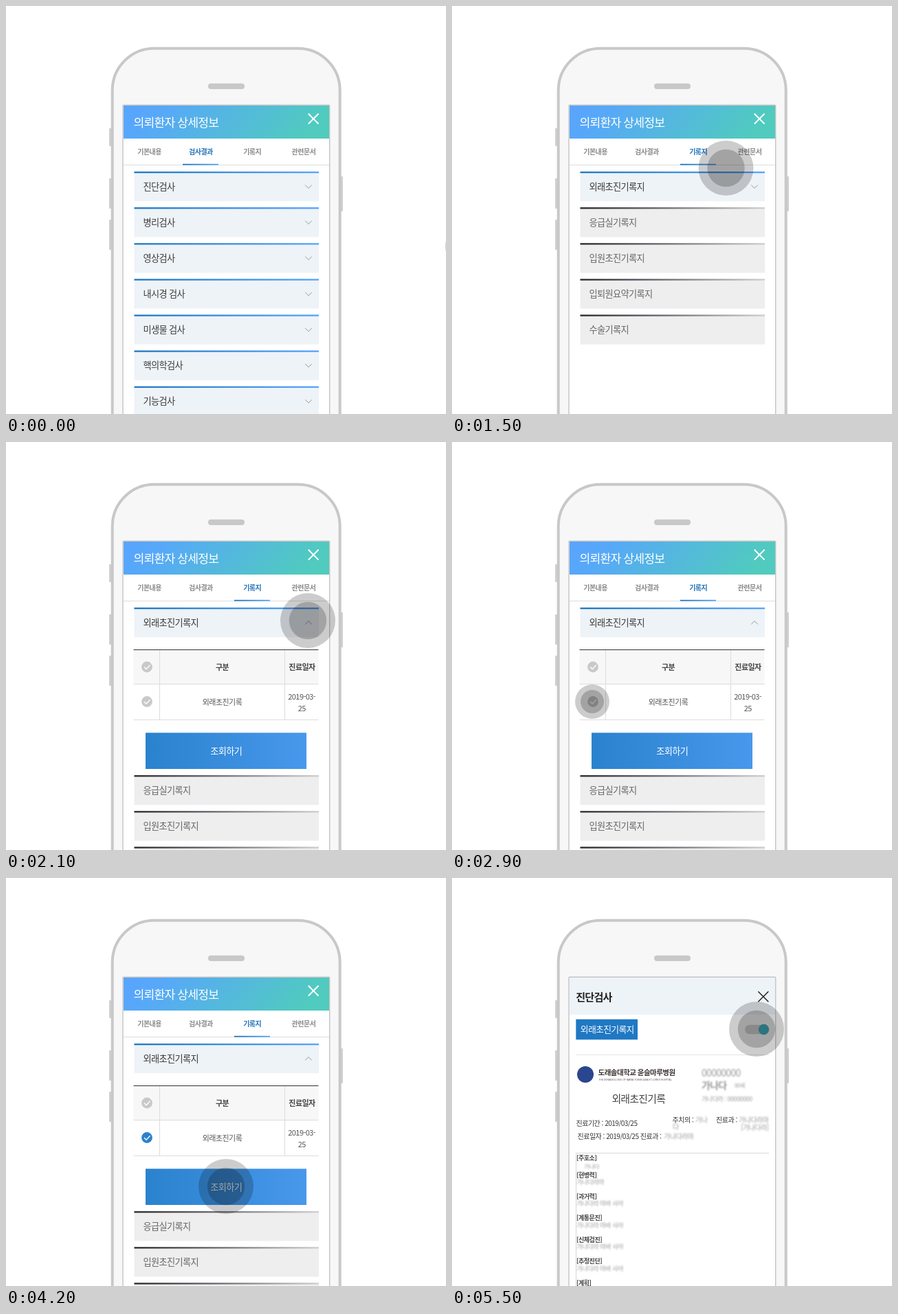
Write an HTML page that moves like this. It is 640 px wide and 594 px high and loops after 7500 ms.

```html
<!DOCTYPE html>
<html lang="ko">
<head>
<meta charset="utf-8">
<title>Record viewer demo</title>
<style>
  html, body { margin: 0; width: 100%; height: 100%; overflow: hidden; background: #fff; }
  svg { display: block; width: 640px; height: 594px; }
  text { font-family: "Noto Sans CJK KR", "Noto Sans KR", "Noto Sans CJK", "Noto Sans CJK JP", sans-serif; letter-spacing: -.05em; white-space: pre; }
  .blur { filter: blur(1.3px); }
</style>
</head>
<body>
<svg id="stage" viewBox="0 0 640 594" xmlns="http://www.w3.org/2000/svg"></svg>
<script>
const LOOP = 7500, STEP = 100;
const OPEN = 192;            // height added by the unfolded record
const CARD_Y = 241, PITCH = 52.1;

const rect = (x, y, w, h, fill, extra = '') =>
  `<rect x="${x}" y="${y}" width="${w}" height="${h}" fill="${fill}" ${extra}/>`;
const line = (d, stroke, width = 1, id = '') =>
  `<path d="${d}" ${id && `id="${id}"`} fill="none" stroke="${stroke}" stroke-width="${width}"/>`;
const group = (id, body, extra = '') => `<g id="${id}" ${extra}>${body}</g>`;
// cy is the middle of the glyphs
const text = (str, x, cy, size, fill, weight = 400, anchor = 'start', extra = '') =>
  `<text x="${x}" y="${cy + size * .37}" font-size="${size}" fill="${fill}" font-weight="${weight}" text-anchor="${anchor}" ${extra}>${str}</text>`;
const grad = (id, ...stops) =>
  `<linearGradient id="${id}" ${stops.shift()}>` +
  stops.map(([o, c]) => `<stop offset="${o}" stop-color="${c}"/>`).join('') + '</linearGradient>';
const cross = (x, y, s, color, w) =>
  line(`M${x} ${y}l${s} ${s}M${x + s} ${y}l${-s} ${s}`, color, w);

function defs() {
  const flat = 'x1="0" x2="1"';
  return '<defs>' +
    grad('head', 'x1="0" y1="0" x2="1" y2=".15"', [0, '#59a4ff'], [.2, '#57a8f8'], [1, '#50cbbe']) +
    grad('blue', flat, [0, '#1f78c0'], [1, '#57a5ff']) +
    grad('dark', flat, [0, '#29252c'], [.4, '#66616b'], [1, '#d0d0d0']) +
    grad('btn', flat, [0, '#2a82cd'], [1, '#4898ec']) +
    `<clipPath id="foldClip">${rect(171, 285, 299, 0, '#000', 'id="foldBox"')}</clipPath>` +
    `<clipPath id="docClip">${rect(171, 258, 299, 0, '#000', 'id="docBox"')}</clipPath>` +
    '</defs>';
}

function phone() {
  const keys = [[150, 178, 26], [150, 251, 44], [150, 311, 44], [486, 248, 51]];
  return keys.map(([x, y, h]) => rect(x, y, 4, h, '#d0d0d0', 'rx="1"')).join('') +
    rect(154.7, 61.7, 331, 640, '#f7f7f7', 'rx="61" stroke="#c8c8c8" stroke-width="4"') +
    rect(294, 112.7, 53, 8.3, '#c8c8c8', 'rx="4.1"') +
    rect(170, 144.2, 300.7, 500, '#fff', 'rx="1" stroke="#c4c4c4" stroke-width="1.4"');
}

function card(label, i, off) {
  const y = CARD_Y + i * PITCH;
  return rect(186.5, y, 268.5, 43.3, off ? '#eee' : '#eef3f8') +
    rect(186.5, y, 268.5, 2.3, off ? 'url(#dark)' : 'url(#blue)') +
    text(label, 199.6, y + 22, 13.2, off ? '#666' : '#3a3a3a');
}
const chevron = (i, id = '') =>
  line(`M435.3 ${CARD_Y + 19.6 + i * PITCH}l4.7 4.8l4.7 -4.8`, '#999', 1, id);

function tabs(active) {
  return ['기본내용', '검사결과', '기록지', '관련문서'].map((s, i) =>
    text(s, 208.6 + i * 74.8, 212.5, 10, i === active ? '#2272bb' : '#8a8a8a', 700, 'middle')).join('') +
    rect(257 + (active - 1) * 75, 229.8, 52, 1.8, 'url(#blue)');
}

function tick(cy, color, id) {
  return `<circle id="${id}" cx="205" cy="${cy}" r="7.9" fill="${color}"/>` +
    line(`M201 ${cy}l3 3.2l5.6 -6`, '#fff', 1.3);
}

function table() {
  return rect(185.5, 302, 269, 50, '#f7f7f7') +
    line('M185.5 352.5h269M185.5 404.5h269M223.5 303v101M405.5 303v101', '#dcdcdc') +
    line('M185.5 302.5h269', '#333') +
    tick(327.5, '#c9c9c9', 'tickAll') + tick(378, '#c9c9c9', 'tickOne') +
    text('구분', 314.5, 328, 11, '#444', 700, 'middle') +
    text('진료일자', 430.5, 328, 11, '#444', 700, 'middle') +
    text('외래초진기록', 314.5, 378.5, 11, '#555', 400, 'middle') +
    text('2019-03-', 430.2, 370.5, 11, '#555', 400, 'middle') +
    text('25', 430.2, 387.5, 11, '#555', 400, 'middle') +
    rect(203, 423.3, 234, 52.7, 'url(#btn)') +
    text('조회하기', 320.3, 449.7, 13.2, '#fff', 500, 'middle');
}

function listPage() {
  const tests = ['진단검사', '병리검사', '영상검사', '내시경 검사', '미생물 검사', '핵의학검사', '기능검사'];
  const notes = ['응급실기록지', '입원초진기록지', '입퇴원요약기록지', '수술기록지'];
  return rect(171, 145, 299, 48, 'url(#head)') +
    text('의뢰환자 상세정보', 185.6, 169.5, 17.2, '#fff') +
    cross(439.8, 156.8, 14.8, '#fff', 2) +
    line('M171 231.5h299', '#dedede') +
    group('tests', tabs(1) + tests.map((s, i) => card(s, i) + chevron(i)).join('')) +
    group('notes', tabs(2) + card('외래초진기록지', 0) + chevron(0, 'foldMark') +
      group('fold', table(), 'clip-path="url(#foldClip)"') +
      group('rest', notes.map((s, i) => card(s, i + 1, true)).join('')));
}

function sheet() {
  const smudge = (s, x, y, size, w = 400) => text(s, x, y, size, '#999', w, 'start', 'class="blur"');
  const info = (s, x, y) => text(s, x, y, 10, '#333');
  const parts = [
    ['주호소', 407.5, ''], ['현병력', 432.5, '가나다라마'], ['과거력', 463.5], ['계통문진', 495],
    ['신체검진', 526.5], ['추정진단', 558], ['계획', 589.5]];
  return '<circle cx="194" cy="286" r="12" fill="#2b4690"/>' +
    text('도래솔대학교 윤슬마루병원', 212.6, 283, 10.5, '#3a3330', 700) +
    text("THE DORAESOL UNIV. OF NARAE YUNSEULMA ST. LORN'S HOSPITAL", 213.5, 293.5, 3.2, '#555', 400, 'start',
      'style="font-family:\'Liberation Sans\',sans-serif;letter-spacing:0"') +
    text('외래초진기록', 232.4, 321, 14.9, '#444') +
    smudge('00000000', 363, 284, 14) + smudge('가나다', 363, 302, 14, 700) +
    smudge('00세', 411, 302, 8) + smudge('가나다라 : 00000000', 363, 322, 9) +
    info('진료기간 : 2019/03/25', 180.5, 357.3) +
    info('진료일자 : 2019/03/25 진료과 : ', 182.5, 376.3) +
    info('주치의 : ', 320.6, 352.5) + smudge('가나', 354, 352, 10) + smudge('다', 321, 362.5, 10) +
    info('진료과 : ', 384, 352.5) + smudge('가나다라마', 417, 352, 10) +
    smudge('[가나다라]', 420, 363, 10) + smudge('가나다라마', 308, 376, 10) +
    line('M180.5 594V400.5H461', '#d8d8d8') +
    parts.map(([s, y, note = '가나다라 마바 사아']) =>
      text(`[${s}]`, 181, y, 9, '#444', 700) + (y < 580 ? smudge(note, 181, y + 10.5, 9.2) : '')).join('') +
    smudge('가나다', 192, 420, 8.5);
}

function viewPage() {
  return rect(171, 145, 299, 449, '#fff') + rect(171, 145, 299, 54, '#eef3f8') +
    text('진단검사', 180.2, 173, 15.1, '#222', 700) +
    cross(445.3, 165.3, 15, '#222', 1.5) +
    rect(180.3, 205.7, 89.7, 29.6, '#1f78c4') +
    text('외래초진기록지', 186.8, 220.7, 12.8, '#fff', 500) +
    rect(426, 213.7, 35, 13.6, '#d6d6d6', 'rx="6.8"') +
    '<circle id="knob" cy="220.5" r="7.7"/>' +
    line('M180 257.5h281', '#777', 1, 'rule') +
    group('sheet', sheet(), 'clip-path="url(#docClip)"');
}

const stage = document.getElementById('stage');
stage.innerHTML = defs() + phone() + group('listPage', listPage()) + group('viewPage', viewPage()) +
  '<g id="touch" fill="#000" fill-opacity=".2"><circle r="40"/><circle r="27.2"/></g>';

// stops of the touch point: [x, y, move start, steps to arrive, release]
const home = [679, 350];
const taps = [
  [358, 212, 500, 3, 1000],
  [439, 260, 1500, 2, 1900],
  [204, 378, 2600, 3, 3100],
  [320, 449, 3600, 2, 4000],
  [443, 220, 4800, 2, 5200]
];

const $ = id => document.getElementById(id);
const set = (id, name, value) => $(id).setAttribute(name, value);
const show = (id, on) => set(id, 'visibility', on ? 'visible' : 'hidden');
// reaches 1 on the last of n steps
const ramp = (t, start, n) => Math.max(0, Math.min(1, (t - start + STEP) / (n * STEP)));

function touchAt(t) {
  let [x, y] = home, scale = 1;
  for (const [tx, ty, start, n, up] of taps) {
    if (t < start) break;
    const p = ramp(t, start, n);
    x += (tx - x) * p;
    y += (ty - y) * p;
    scale = t >= start + n * STEP && t < up ? .625 : 1;
  }
  return `translate(${x} ${y}) scale(${scale})`;
}

function draw(ms) {
  const t = Math.floor((ms % LOOP) / STEP) * STEP;
  const viewing = t >= 4300, notes = t >= 1000, on = t >= 5200;
  show('listPage', !viewing);
  show('viewPage', viewing);
  $('tests').style.display = notes ? 'none' : '';
  $('notes').style.display = notes ? '' : 'none';

  const fold = ramp(t, 1900, 3) * OPEN;
  set('foldBox', 'height', fold + 4);
  show('fold', fold > 0 && !viewing);
  set('rest', 'transform', `translate(0 ${fold})`);
  set('foldMark', 'transform', fold ? 'matrix(1 0 0 -1 0 526)' : '');
  set('tickOne', 'fill', t >= 3100 ? '#2a82cd' : '#c9c9c9');

  const open = ramp(t, 5200, 4);
  set('docBox', 'height', open * 336);
  show('sheet', on);
  set('rule', 'stroke', on ? '#e4e4e4' : '#777');
  set('knob', 'cx', 433.3 + 20.2 * open);
  set('knob', 'fill', on ? '#45b5c6' : '#666');

  set('touch', 'transform', touchAt(t));
}

const begin = performance.now();
function tickFrame() {
  draw(performance.now() - begin);
  requestAnimationFrame(tickFrame);
}
tickFrame();
</script>
</body>
</html>
```
